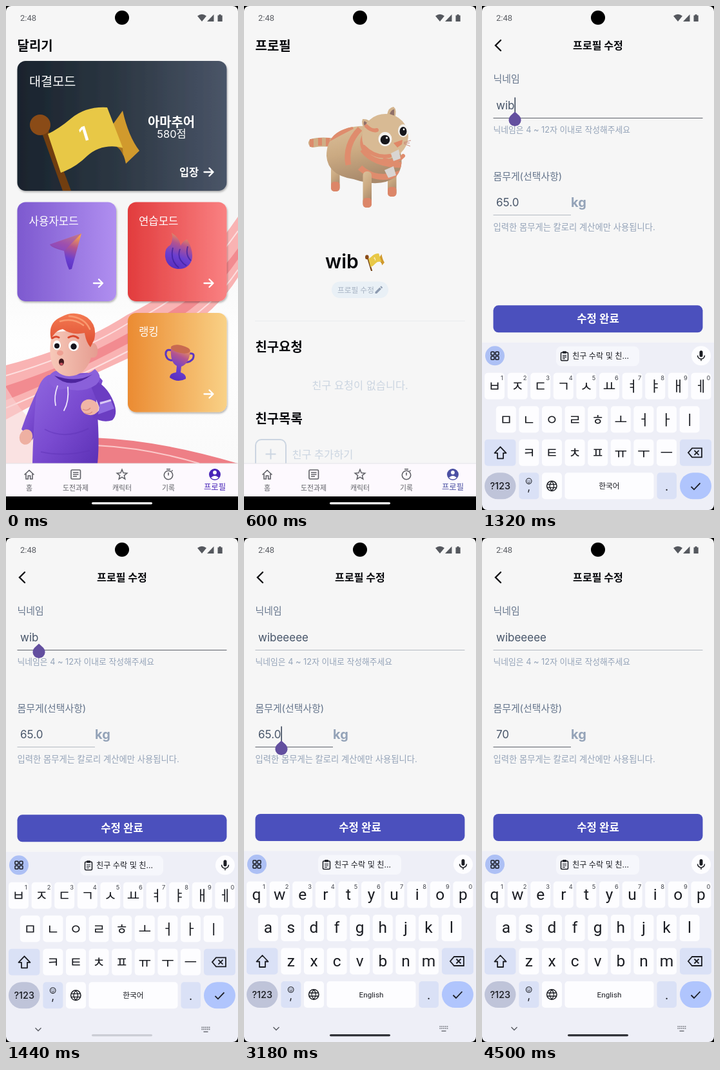
An HTML page that plays this animation: 360 px wide and 780 px high, repeating every 4560 ms.

```html
<!DOCTYPE html>
<html lang="ko">
<head>
<meta charset="utf-8">
<title>프로필 수정</title>
<style>
html, body { margin: 0; width: 100%; height: 100%; overflow: hidden; background: #000; }
svg { display: block; width: 100%; height: 100%; }
text { font-family: Inter, 'Noto Sans CJK KR', 'Noto Sans CJK', sans-serif; white-space: pre; }
.key, .key text { font-family: Roboto, 'Noto Sans CJK KR', 'Noto Sans CJK', sans-serif; }
</style>
</head>
<body>
<svg id="stage" viewBox="0 0 360 780"></svg>
<script>
const LOOP = 4560;
const $ = id => document.getElementById(id);
const clamp = v => v < 0 ? 0 : v > 1 ? 1 : v;
const easeOut = u => 1 - (1 - clamp(u)) ** 3;

// ---- drawing helpers ----
const text = (x, y, size, fill, s, o = {}) =>
  `<text x="${x}" y="${y}" font-size="${size}" fill="${fill}" font-weight="${o.w || 400}" text-anchor="${o.a || 'start'}" ${o.x || ''}>${s}</text>`;
const rect = (x, y, w, h, r, fill, extra = '') =>
  `<rect x="${x}" y="${y}" width="${w}" height="${h}" rx="${r}" fill="${fill}" ${extra}/>`;
const circle = (x, y, r, fill, extra = '') => `<circle cx="${x}" cy="${y}" r="${r}" fill="${fill}" ${extra}/>`;
const oval = (x, y, rx, ry, fill, turn = 0) =>
  `<ellipse cx="${x}" cy="${y}" rx="${rx}" ry="${ry}" fill="${fill}" transform="rotate(${turn} ${x} ${y})"/>`;
const shape = (d, fill, extra = '') => `<path d="${d}" fill="${fill}" ${extra}/>`;
const line = (d, color, w, extra = '') =>
  `<path d="${d}" fill="none" stroke="${color}" stroke-width="${w}" ${extra}/>`;
const round = 'stroke-linecap="round" stroke-linejoin="round"';
const grad = (id, dir, ...colors) => {
  const [x1, y1, x2, y2] = dir;
  const stops = colors.map((c, i) => `<stop offset="${i / (colors.length - 1)}" stop-color="${c}"/>`);
  return `<linearGradient id="${id}" x1="${x1}" y1="${y1}" x2="${x2}" y2="${y2}">${stops.join('')}</linearGradient>`;
};
const mid = { a: 'middle' };
const bold = { w: 700 };

const ACROSS = [0, 0, 1, 0], DOWN = [0, 0, 0, 1];
const defs = `<defs>
  ${grad('navy', ACROSS, '#19232d', '#2d3844', '#4a5568')}
  ${grad('violet', ACROSS, '#7d59cf', '#b08ff0')}
  ${grad('red', ACROSS, '#e23c3d', '#f98182')}
  ${grad('amber', ACROSS, '#eb8b32', '#f9d186')}
  ${grad('glow', [.7, 0, .4, 1], '#f8a54c', '#b4548f', '#6a3fd0', '#5a2fc0')}
  ${grad('hoodie', [0, 0, 1, 1], '#9068e0', '#7a4bd0', '#5a2fb4')}
  ${grad('hair', DOWN, '#f47a52', '#dd4c30')}
  ${grad('skin', ACROSS, '#f7c9b9', '#e59c90')}
  ${grad('fur', [0, 0, .3, 1], '#dcc09a', '#cbaa82', '#a98a6c')}
  ${grad('sky', DOWN, '#f6f6f6', '#fefefe', '#fafafa')}
  <filter id="shadow" x="-10%" y="-10%" width="120%" height="120%">
    <feDropShadow dx="1" dy="2" stdDeviation="1.5" flood-opacity=".3"/></filter>
  <clipPath id="screen"><rect width="360" height="780" rx="8"/></clipPath>
  <clipPath id="page"><rect width="360" height="759"/></clipPath>
  <clipPath id="torso"><path d="M128 232Q128 190 178 186Q215 184 238 210Q252 245 236 264Q212 282 170 268Q130 262 128 232Z"/></clipPath>
</defs>`;

// ---- shared pieces ----
const flag = shape('M56 197L66 193L101 286H88Z', '#713e10') + circle(53, 184, 16, '#8a4b17') +
  shape('M181 162L166 183L157 214Q180 212 186 244L207 224Q190 202 181 162Z', '#d19a2d') +
  shape('M157 214L181 220L182 232Q176 214 157 214Z', '#a87420') +
  shape('M65 198Q82 190 101 174Q124 155 157 157L181 219Q148 212 126 232Q108 250 85 258Z', '#e8c846') +
  text(121, 209, 31, '#fff', '1', { w: 700, a: 'middle', x: 'transform="rotate(-17 121 199)"' });

const arrow = (x, y) => line(`M${x} ${y}h14m-6 -6l6 6l-6 6`, '#fff', 2.3, round);

function navBar(id) {
  const gray = '#5f6066';
  const label = (x, s) => text(x, 750, 10.9, gray, s, mid);
  let star = '';
  for (let i = 0; i < 10; i++) {
    const r = i % 2 ? 3.6 : 8.2, a = i * Math.PI / 5;
    star += `${i ? 'L' : 'M'}${(180 + r * Math.sin(a)).toFixed(1)} ${(725.5 - r * Math.cos(a)).toFixed(1)}`;
  }
  return rect(0, 708, 360, 51, 0, '#fdf9fe') + rect(0, 707.5, 360, 1, 0, '#e6e5e9') +
    line('M28.5 725.5L36 718.5L43.5 725.5M31 724v8h3.3v-5h3.4v5h3.3v-8', gray, 1.6) +
    rect(101, 718, 14.5, 14, 1.5, 'none', `stroke="${gray}" stroke-width="1.6"`) +
    line('M104 722h8.5M104 725h8.5M104 728h6', gray, 1.4) +
    line(star + 'Z', gray, 1.5) +
    circle(252, 726, 6.7, 'none', `stroke="${gray}" stroke-width="1.6"`) +
    line('M249 716.7h6M252 722v4.5M257 720l1.5 -1.5', gray, 1.6) +
    label(36, '홈') + label(108, '도전과제') + label(180, '캐릭터') + label(252, '기록') +
    `<g id="${id}" fill="#4b50a3">${circle(324, 725, 9, 'inherit')}
      <text x="324" y="749" font-size="12.4" font-weight="500" text-anchor="middle">프로필</text></g>` +
    circle(324, 722, 2.9, '#fff') + shape('M318 730Q324 724 330 730Q324 735 318 730Z', '#fff');
}

// ---- home page ----
const track = shape('M0 556Q110 528 188 478Q290 430 360 326V420Q310 500 190 545Q90 590 0 640Z', '#f9b3b3') +
  shape('M0 588Q100 556 190 506Q300 460 360 375V392Q300 480 190 522Q90 575 0 610Z', '#f28b90') +
  line('M0 572Q110 540 188 492Q290 448 360 348M0 622Q90 585 190 534Q305 490 360 408', '#fde0e0', 2) +
  shape('M0 590Q20 625 48 650V708H0Z', '#fbd3d2', 'opacity=".6"') +
  shape('M135 668Q240 672 360 708H130Z', '#ee7f86') +
  line('M140 680Q220 684 300 708', '#fbc9ca', 2);

const boy =
  shape('M50 592Q36 620 24 655L40 672L62 640Z', 'url(#hoodie)') +
  oval(31, 667, 10, 12, '#eeb0a2', 20) +
  shape('M66 571Q50 578 46 610Q42 660 41 708H142Q146 670 140 610L150 580Q140 566 120 568Z', 'url(#hoodie)') +
  shape('M126 574Q152 582 164 606Q176 630 165 641Q150 646 134 636L146 624Z', '#6b3dc2') +
  shape('M146 612L163 611L168 623L143 632Z', '#8f6ae0') +
  line('M146 615L163 610', '#d9c9f4', 3) +
  oval(130, 621, 14, 12, '#f0b5a6', 15) + line('M119 624q7 4 12 -2M122 630q7 3 12 -2', '#d98c80', 1.3) +
  shape('M64 578Q72 560 88 566Q120 578 138 562Q152 574 140 586Q120 600 92 592Q74 598 64 578Z', '#8a60da') +
  shape('M75 572Q100 596 134 570Q110 584 75 572Z', '#4d259e') +
  line('M80 588Q74 604 77 618M96 590Q98 612 90 626', '#efe6fb', 1.8, round) +
  line('M60 655Q90 672 128 654M54 690Q90 698 130 688', '#6035b8', 2, 'opacity=".5"') +
  shape('M72 505Q66 530 70 548Q76 572 98 573Q124 572 132 544Q144 546 142 530Q140 520 132 522L128 500Z', 'url(#skin)') +
  shape('M70 516Q64 490 86 481Q106 470 126 482Q142 494 137 516L131 528Q124 520 122 506Q102 510 88 500Q76 502 70 516Z', 'url(#hair)') +
  line('M84 488Q104 482 120 494M98 480Q122 482 130 500', '#f99a70', 2.5, round) +
  oval(79, 525, 6, 7.5, '#fff') + oval(105, 526, 8, 8, '#fff') +
  circle(79, 526, 4, '#16141c') + circle(105, 527, 4.7, '#16141c') +
  line('M72 514q5 -4 10 -1M97 513q8 -5 15 1', '#d9472d', 3, round) +
  oval(84, 537, 5, 4, '#ee9f92') + oval(86, 551, 4, 5.5, '#431a20') + oval(86, 554, 2.6, 2, '#c6505a');

const card = (x, y, w, h, fill) => rect(x, y, w, h, 13, `url(#${fill})`, 'filter="url(#shadow)"');

const home = rect(0, 0, 360, 759, 0, '#f6f6f6') + rect(0, 336, 360, 372, 0, 'url(#sky)') + track +
  text(17.5, 68.5, 20, '#08090d', '달리기', bold) +
  card(17.5, 85, 325, 201, 'navy') + flag +
  text(36, 123.5, 19.7, '#fff', '대결모드', { w: 500 }) +
  text(256.5, 186.5, 19.9, '#fff', '아마추어', { w: 700, a: 'middle' }) +
  text(257, 204, 16.5, '#fff', '580점', mid) +
  text(269, 262.5, 16.4, '#fff', '입장', { w: 600 }) + arrow(307.5, 257) +
  card(17.5, 303.5, 153.5, 153.5, 'violet') + text(35.5, 338.5, 16.8, '#fff', '사용자모드', { w: 500 }) + arrow(136, 429) +
  shape('M117 352L68 369Q70 374 90 379Q93 398 98 408L102 407Z', 'url(#glow)') +
  shape('M117 352L90 379L68 369Z', '#8c4bc8', 'opacity=".55"') +
  card(189, 303.5, 153.5, 153.5, 'red') + text(206, 338.5, 16.7, '#fff', '연습모드', { w: 500 }) + arrow(307.5, 429) +
  shape('M257 351Q269 358 271 371Q274 364 281 361Q292 380 288 394Q282 408 266 407Q249 404 247 388Q246 374 255 370Q260 362 257 351Z', 'url(#glow)') +
  line('M259 374Q254 394 268 405M270 376Q264 392 280 402M282 372Q278 386 287 394', '#3d1f9c', 2, 'opacity=".7"') +
  card(189, 475, 153.5, 153.5, 'amber') + text(206, 509.5, 16.7, '#fff', '랭킹', { w: 500 }) + arrow(307.5, 600.5) +
  line('M257 533Q247 530 248 540Q250 550 261 548M284 538Q294 536 290 546Q285 552 279 551', '#5a35c2', 3) +
  shape('M256 527Q270 522 286 534Q284 554 272 558L271 567Q280 570 279 577Q266 584 254 575Q254 568 264 567L265 557Q254 552 256 527Z', 'url(#glow)') +
  oval(271, 531, 15, 6, '#c86a50', 12) +
  boy + navBar('tabA');

// ---- profile page ----
const leg = (x, y, h) => rect(x, y, 13.5, h, 6, 'url(#fur)') + rect(x, y + h - 15, 13.5, 15, 5, '#dc8668');
const stripe = d => line(d, '#df8c6d', 9);
const cat =
  line('M107 212Q122 209 142 212', '#cfae86', 14, round) + line('M105 206v12M118 204v12M130 204v13', '#dc8a6b', 6) +
  leg(135, 242, 45) + leg(223, 250, 45) +
  shape('M128 232Q128 190 178 186Q215 184 238 210Q252 245 236 264Q212 282 170 268Q130 262 128 232Z', 'url(#fur)') +
  `<g clip-path="url(#torso)">${stripe('M130 206Q148 196 168 186')}${stripe('M162 246Q156 215 180 190')}
   ${stripe('M184 222Q202 246 246 246')}${stripe('M180 250Q206 274 245 258')}${stripe('M188 200Q180 215 192 228')}</g>` +
  leg(184.5, 256, 56) +
  shape('M188 192Q181 182 184 175Q194 174 200 184ZM222 168Q224 157 232 156Q238 160 234 174Z', '#d3b48e') +
  shape('M188 187Q184 181 187 178L194 183ZM226 167Q229 160 233 160L233 170Z', '#8f7069') +
  oval(219, 202, 36, 35, '#d8ba94', -20) +
  line('M186 218Q204 236 226 232M190 186Q198 194 206 192', '#df8c6d', 6, round) +
  line('M218 238Q236 244 247 232', '#df8c6d', 6, round) +
  shape('M228 228L240 222L243 236L232 240ZM218 254L232 248L236 262L224 266Z', '#d9d5d2') +
  oval(219, 206, 10.5, 11, '#f4f2ee') + oval(247, 193, 8, 10, '#f4f2ee') +
  circle(219, 207, 7.3, '#17171b') + oval(247, 194, 5.5, 7, '#17171b') +
  circle(221.5, 204, 1.6, '#fff') + circle(248, 191, 1.4, '#fff') +
  shape('M232 212L246 207L245 214L238 219Z', '#e08766') +
  line('M248 211l11 -3M248 213l10 4M248 212l9 0', '#c98a78', 1);

const pale = '#cbd5e1';
const profile = rect(0, 0, 360, 759, 0, '#f6f6f6') + text(17.5, 68.5, 20, '#08090d', '프로필', bold) + cat +
  text(126, 406, 30, '#08090d', 'wib', { w: 600 }) +
  `<g transform="translate(181.5 350) scale(.176 .21)">${flag}</g>` +
  rect(136, 426.5, 88, 25.5, 12.7, '#e9f0f6') + text(145, 444, 11.7, '#a5b1c2', '프로필 수정', { w: 500 }) +
  shape('M203.5 442.5L210.5 435.5L213 438L206 445H203.5ZM211.3 434.7L212.8 433.2L215.2 435.7L213.8 437.2Z', '#8d9bb0') +
  rect(17, 487, 326, 1, 0, '#e9ebee') +
  text(17.5, 534.5, 19.9, '#08090d', '친구요청', bold) +
  text(180, 593, 16.4, pale, '친구 요청이 없습니다.', mid) +
  text(17.5, 645.5, 19.9, '#08090d', '친구목록', bold) +
  rect(18, 671, 47, 47, 9, 'none', `stroke="${pale}" stroke-width="2"`) +
  line('M33.5 693.5h16M41.5 685.5v16', pale, 2) +
  text(74.5, 699.5, 16.4, pale, '친구 추가하기', { w: 500 }) + navBar('tabB');

// ---- edit page ----
const slate = '#64748b', soft = '#94a3b8', ink = '#475569';
const teardrop = id => `<path id="${id}" d="M0 0L6.8 6.2A9.6 9.6 0 1 1 -6.8 6.2Z" fill="#634f9f"/>`;
const edit = rect(0, 0, 360, 759, 0, '#f6f6f6') +
  line('M29 53L21 61L29 69', '#0c0d12', 2.4, 'stroke-linecap="round"') +
  text(180, 67, 16.1, '#08090d', '프로필 수정', { w: 700, a: 'middle' }) +
  text(17.5, 118, 14.9, slate, '닉네임') + text(22, 160, 17, ink, '', { x: 'id="nick"' }) +
  rect(17.5, 173, 325, 1, 0, '#b4bac2', 'id="nickLine"') +
  text(17.5, 196, 12.8, soft, '닉네임은 4 ~ 12자 이내로 작성해주세요') +
  text(17.5, 268.7, 14.9, slate, '몸무게(선택사항)') + text(22, 310, 17, ink, '', { x: 'id="weight"' }) +
  rect(17.5, 323, 120.5, 1, 0, '#b4bac2', 'id="weightLine"') +
  text(138, 310.5, 20, soft, 'kg', bold) +
  text(17.5, 347, 13.3, soft, '입력한 몸무게는 칼로리 계산에만 사용됩니다.') +
  rect(0, 0, 1.6, 23, 0, '#3b475a', 'id="cursor"') + teardrop('handle') +
  `<g id="done">${rect(17.5, 0, 325, 42, 8, '#4b50bd')}${text(180, 27, 16.7, '#fff', '수정 완료', { w: 600, a: 'middle' })}</g>`;

// ---- keyboard ----
const STEP = 35.6, dark = '#1a1c22';
const rows = [[4, 531.5], [21.8, 583], [57.4, 634.5]];
const cap = (x, y, w, fill = '#fdfdff', r = 5) => rect(x, y, w, 41, r, fill);
function letters(id, words, size, dy, lang) {
  const keys = words.map((word, r) => [...word].map((c, i) =>
    text(rows[r][0] + 15.5 + i * STEP, rows[r][1] + dy, size, dark, c, mid)).join('')).join('');
  return `<g id="${id}" class="key">${keys}${text(197.5, 711, 11.7, dark, lang, mid)}</g>`;
}
function keyboard() {
  let s = rect(0, 484.5, 360, 300, 0, '#eeeff7') + circle(20, 505, 15, '#adc0f5');
  for (const [x, y] of [[14, 499], [21, 499], [14, 506], [21, 506]])
    s += rect(x, y, 5, 5, 1, 'none', `stroke="${dark}" stroke-width="1.5"`);
  s += rect(115, 490.5, 129, 30.5, 8, '#f6f7fc') +
    rect(122.5, 500, 11, 12.5, 1.5, 'none', `stroke="${dark}" stroke-width="1.5"`) +
    rect(125, 498, 6, 3.5, 1, dark) + line('M125 504.5h6M125 507h6M125 509.5h4', dark, 1.1) +
    text(140, 510, 12.2, dark, '친구 수락 및 친...') +
    circle(340, 505, 15, '#fdfdff') + rect(337.5, 497, 5, 10, 2.5, dark) +
    line('M334.5 504.5a5.5 5.5 0 0 0 11 0M340 510v3', dark, 1.5);
  [10, 9, 7].forEach((n, r) => {
    for (let i = 0; i < n; i++) s += cap(rows[r][0] + i * STEP, rows[r][1], 31);
  });
  for (let i = 0; i < 10; i++) s += text(31 + i * STEP, 542.5, 9.3, '#43464e', (i + 1) % 10, mid);
  const tint = '#dae1f6';
  s += cap(4, 634.5, 48.5, tint) + cap(307, 634.5, 49, tint) +
    line('M28.5 646L37.5 655.5H33V664H24V655.5H19.5Z', dark, 1.8, round) +
    line('M326 648H341V662H326L320 655ZM329.5 651.5l7 7M336.5 651.5l-7 7', dark, 1.8) +
    cap(4, 686, 48.5, '#bfc4d9', 20.5) + text(28.3, 712, 14.5, dark, '?123', { w: 500, a: 'middle' }) +
    cap(57.4, 686, 31, tint) + circle(72.7, 699, 4.3, 'none', `stroke="${dark}" stroke-width="1.1"`) +
    circle(71.2, 698, .7, dark) + circle(74.2, 698, .7, dark) + line('M70.5 700q2.2 2.5 4.4 0', dark, 1) +
    text(72.7, 714, 17, dark, ',', mid) +
    cap(93, 686, 31) + circle(108.3, 706.5, 7.7, 'none', `stroke="${dark}" stroke-width="1.5"`) +
    line('M101 704h14.6M101 709h14.6M108.3 699q-6.5 7.5 0 15q6.5 -7.5 0 -15', dark, 1.3) +
    cap(128.5, 686, 138) + cap(271.5, 686, 30.5, tint) + text(286.7, 714, 18, dark, '.', mid) +
    cap(307, 686, 49, '#b0c5fd', 20.5) + line('M324.5 707.5l4.5 4.5l9.5 -10', dark, 1.8) +
    line('M45.5 757l4.5 4.5l4.5 -4.5', '#595c63', 1.4) +
    line('M303.5 756h13M303.5 759h13', '#6c6f77', 1.7, 'stroke-dasharray="1.7 1.1"') +
    line('M306.5 763h7', '#6c6f77', 1.5);
  return s + letters('korean', ['ㅂㅈㄷㄱㅅㅛㅕㅑㅐㅔ', 'ㅁㄴㅇㄹㅎㅗㅓㅏㅣ', 'ㅋㅌㅊㅍㅠㅜㅡ'], 21.5, 28.5, '한국어') +
    letters('english', ['qwertyuiop', 'asdfghjkl', 'zxcvbnm'], 24.5, 28, 'English');
}

const status = text(22, 23, 13, '#5b5e64', '2:48', { x: 'class="key"' }) +
  shape('M297 15.5Q304 10 311 15.5L304 24Z', '#55585e') + shape('M312 24L322.5 13V24Z', '#55585e') +
  shape('M328.5 14.5h2v-1.5h3v1.5h2.2V24h-7.2Z', '#55585e') + circle(180, 18, 11, '#000');

$('stage').innerHTML = defs + `<rect width="360" height="780"/><g clip-path="url(#screen)">
  <g clip-path="url(#page)"><g id="home">${home}</g><g id="profile">${profile}</g><g id="edit">${edit}</g></g>
  ${rect(133, 768, 94, 3.2, 1.6, '#fff')}
  <g id="keys">${keyboard()}</g>${rect(133, 768, 94, 3.2, 1.6, '#303238', 'id="pill"')}${status}</g>`;

// ---- motion ----
const typed = [1860, 1970, 2080, 2180, 2300];
const weights = [[0, '65.0'], [3420, '65.'], [3520, '65'], [3620, '6'], [3720, ''], [3840, '7'], [3960, '70']];
const FOCUS = 920, REFOCUS = 3000;
const edits = [FOCUS, ...typed, REFOCUS, ...weights.slice(1).map(w => w[0])];

const show = (id, on) => $(id).setAttribute('display', on ? 'inline' : 'none');
const move = (id, x, y) => $(id).setAttribute('transform', `translate(${x} ${y})`);
const mix = (a, b, u) => `rgb(${a.map((v, i) => Math.round(v + (b[i] - v) * u))})`;

function draw(t) {
  show('home', t < 60);
  show('profile', t >= 60 && t < 870);
  const tab = mix([72, 36, 184], [75, 80, 163], clamp((t - 60) / 240));
  $('tabA').setAttribute('fill', tab);
  $('tabB').setAttribute('fill', tab);

  const slide = easeOut((t - 615) / 255);
  show('edit', t > 615);
  move('profile', -120 * slide, 0);
  move('edit', 360 * (1 - slide), 0);

  const rise = easeOut((t - 1140) / 360), top = 780 - 295.5 * rise;
  show('keys', rise > 0);
  move('keys', 0, top - 484.5);
  move('done', 0, top > 757 ? 699.5 : top - 57.5);
  $('pill').setAttribute('opacity', clamp((t - 1390) / 280));
  show('korean', t < 1740);
  show('english', t >= 1740);

  $('nick').textContent = 'wib' + 'e'.repeat(typed.filter(k => t >= k).length);
  $('weight').textContent = weights.filter(w => t >= w[0]).pop()[1];

  const onWeight = t >= REFOCUS, onNick = t >= FOCUS && !onWeight;
  $('nickLine').setAttribute('fill', onNick ? '#5c616a' : '#b4bac2');
  $('weightLine').setAttribute('fill', onWeight ? '#5c616a' : '#b4bac2');

  const last = edits.filter(k => t >= k).pop();
  const field = $(onWeight ? 'weight' : 'nick');
  const end = 22 + (field.textContent ? field.getComputedTextLength() : 0);
  show('cursor', t >= FOCUS && Math.floor((t - last) / 500) % 2 === 0);
  move('cursor', end, onWeight ? 291.5 : 141.5);
  show('handle', last === FOCUS || last === REFOCUS);
  move('handle', end + .6, onWeight ? 313.5 : 163.5);
}

function tick() {
  draw(performance.now() % LOOP);
  requestAnimationFrame(tick);
}
tick();
</script>
</body>
</html>
```
